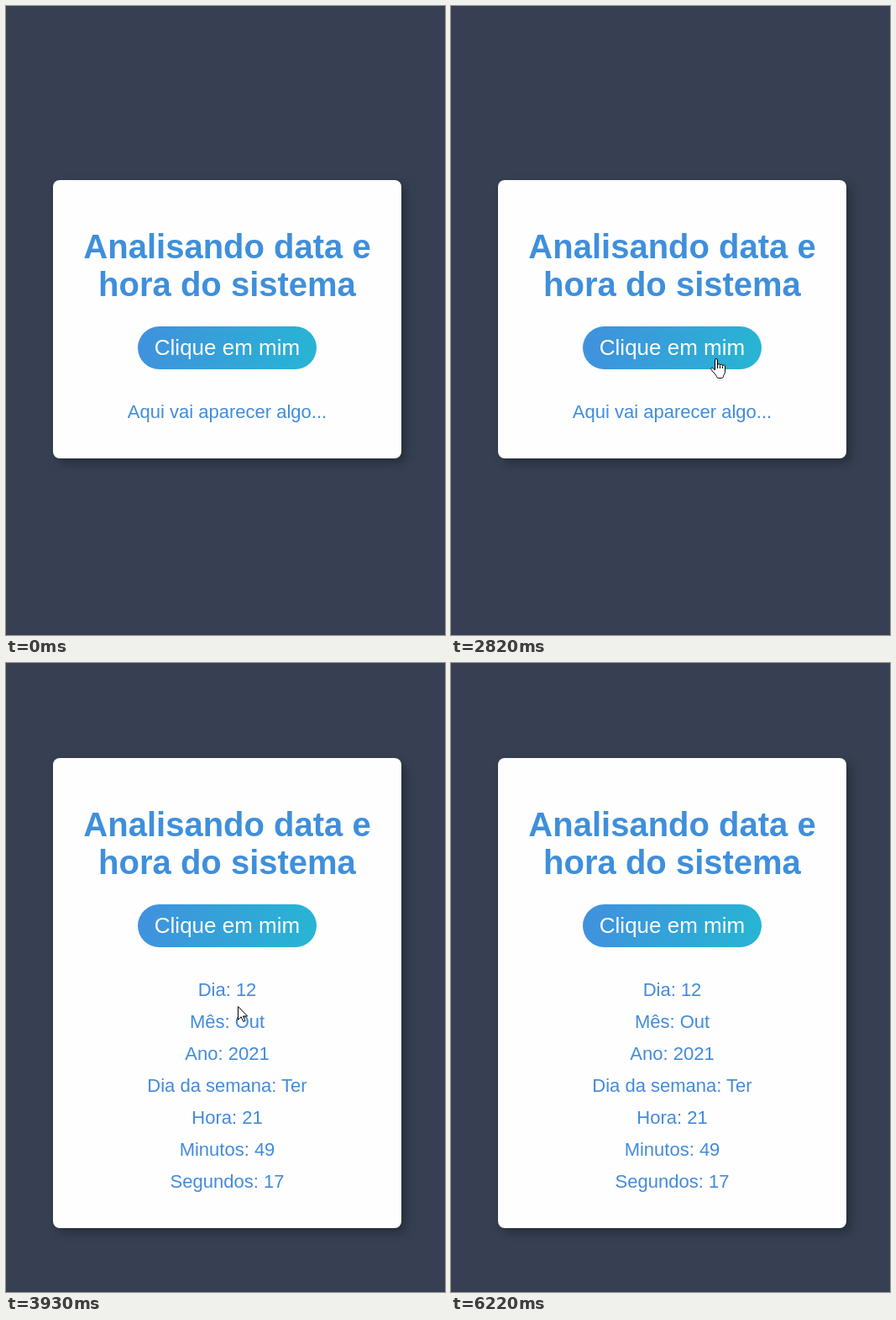
Recreate the animation shown at these times as an HTML page. Size 523 px wide and 748 px high, loop 6740 ms.

```html
<!DOCTYPE html>
<html lang="pt-BR">
<head>
<meta charset="utf-8">
<title>Data e hora</title>
<style>
html, body { margin: 0; width: 100%; height: 100%; overflow: hidden; background: #364052; }
svg { display: block; position: absolute; left: 0; top: 0; }
text { font-family: Arial, "Liberation Sans", sans-serif; text-anchor: middle; }
#card { fill: #fefefe; filter: drop-shadow(5px 5px 6px rgba(0, 0, 0, .3)); }
.title { font-size: 40px; font-weight: bold; fill: #3f8fdc; }
.label { font-size: 26px; fill: #fff; }
.info { font-size: 22px; fill: #428bdb; }
#arrow, #hand { fill: #fff; stroke: #000; stroke-linejoin: round; }
</style>
</head>
<body>
<svg width="523" height="748" viewBox="0 0 523 748">
  <defs>
    <linearGradient id="fill" gradientUnits="userSpaceOnUse" x1="157" y1="381" x2="366" y2="432">
      <stop offset="0" stop-color="#4190de"/>
      <stop offset="1" stop-color="#27b5d3"/>
    </linearGradient>
  </defs>
  <g id="page">
    <rect id="card" x="56" y="207" width="415" height="331" rx="8"/>
    <text class="title" x="263.5" y="300">Analisando data e</text>
    <text class="title" x="263.5" y="345">hora do sistema</text>
    <rect x="157" y="381" width="213" height="51" rx="25.5" fill="url(#fill)"/>
    <text class="label" x="263.5" y="415">Clique em mim</text>
    <g id="before"></g>
    <g id="after"></g>
  </g>
  <g id="cursor">
    <circle id="press" cy="-1" r="12" fill="#ff0" fill-opacity=".47"/>
    <path id="arrow" d="M.5.5V16.3L4.2 12.8 6.8 18.5 9 17.5 6.5 12H11.6Z"/>
    <g id="hand" transform="translate(-6 0)">
      <path d="M5.5 14V2a1.5 1.5 0 0 1 3 0v6a1.5 1.5 0 0 1 3 .4a1.5 1.5 0 0 1 3 .7a1.5 1.5 0 0 1 3 1v6c0 2.5-2 3.500-2 5.500q-.5 1.900-2 1.900h-4q-1.500 0-2-1.900C6.500 19 3.500 17 1 13.500c-1-1.700 1-2.900 2.300-1.700z"/>
      <path d="M8.500 8v4M11.500 8.500v3.500M14.500 9.500v2.500" fill="none"/>
    </g>
  </g>
</svg>
<script>
const LOOP = 6740, STEP = 20, ENTER = 1760, PRESS = 3580, RELEASE = 3680, UPDATE = 3840, LEAVE = 6220;
const $ = id => document.getElementById(id);
const show = (id, on) => $(id).setAttribute("display", on ? "inline" : "none");

// Pointer path: time, x, y
const path = [
  [1760, 523, 523], [2160, 405, 482], [2420, 365, 447], [2820, 315, 419],
  [3100, 288, 412], [3310, 276, 409], [3580, 276, 408], [5040, 276, 408],
  [5520, 364, 513], [5710, 393, 548], [5960, 430, 632], [6220, 476, 748]
];

const slope = (i, k) => (path[i + 1][k] - path[i][k]) / (path[i + 1][0] - path[i][0]);

function tangent(i, k) {
  if (i === 0) return slope(0, k);
  if (i === path.length - 1) return slope(i - 1, k);
  const a = slope(i - 1, k), b = slope(i, k);
  return a * b > 0 ? 2 * a * b / (a + b) : 0;
}

// Monotone cubic interpolation of coordinate k
function at(t, k) {
  let i = 0;
  while (i < path.length - 2 && t >= path[i + 1][0]) i++;
  const p = path[i], q = path[i + 1], h = q[0] - p[0];
  const u = Math.min(1, Math.max(0, (t - p[0]) / h)), v = 1 - u;
  return Math.round(
    p[k] * v * v * (1 + 2 * u) + q[k] * u * u * (3 - 2 * u) +
    h * u * v * (v * tangent(i, k) - u * tangent(i + 1, k)));
}

function addLines(id, lines) {
  $(id).innerHTML = lines.map((line, i) =>
    `<text class="info" x="263.5" y="${490 + 38 * i}">${line}</text>`).join("");
}

addLines("before", ["Aqui vai aparecer algo..."]);
addLines("after", ["Dia: 12", "Mês: Out", "Ano: 2021", "Dia da semana: Ter",
  "Hora: 21", "Minutos: 49", "Segundos: 17"]);

function draw(time) {
  const t = Math.floor(time / STEP) * STEP;
  const done = t >= UPDATE;
  $("page").setAttribute("transform", `translate(0 ${done ? -94 : 0})`);
  $("card").setAttribute("height", done ? 559 : 331);
  show("before", !done);
  show("after", done);

  const x = at(t, 1), y = at(t, 2);
  const hover = t < RELEASE && y < 432;
  $("cursor").setAttribute("transform", `translate(${x} ${y})`);
  show("cursor", t >= ENTER && t < LEAVE);
  show("press", t >= PRESS && t < RELEASE);
  show("hand", hover);
  show("arrow", !hover);
}

const start = performance.now();
function tick() {
  draw((performance.now() - start) % LOOP);
  requestAnimationFrame(tick);
}
tick();
</script>
</body>
</html>
```
